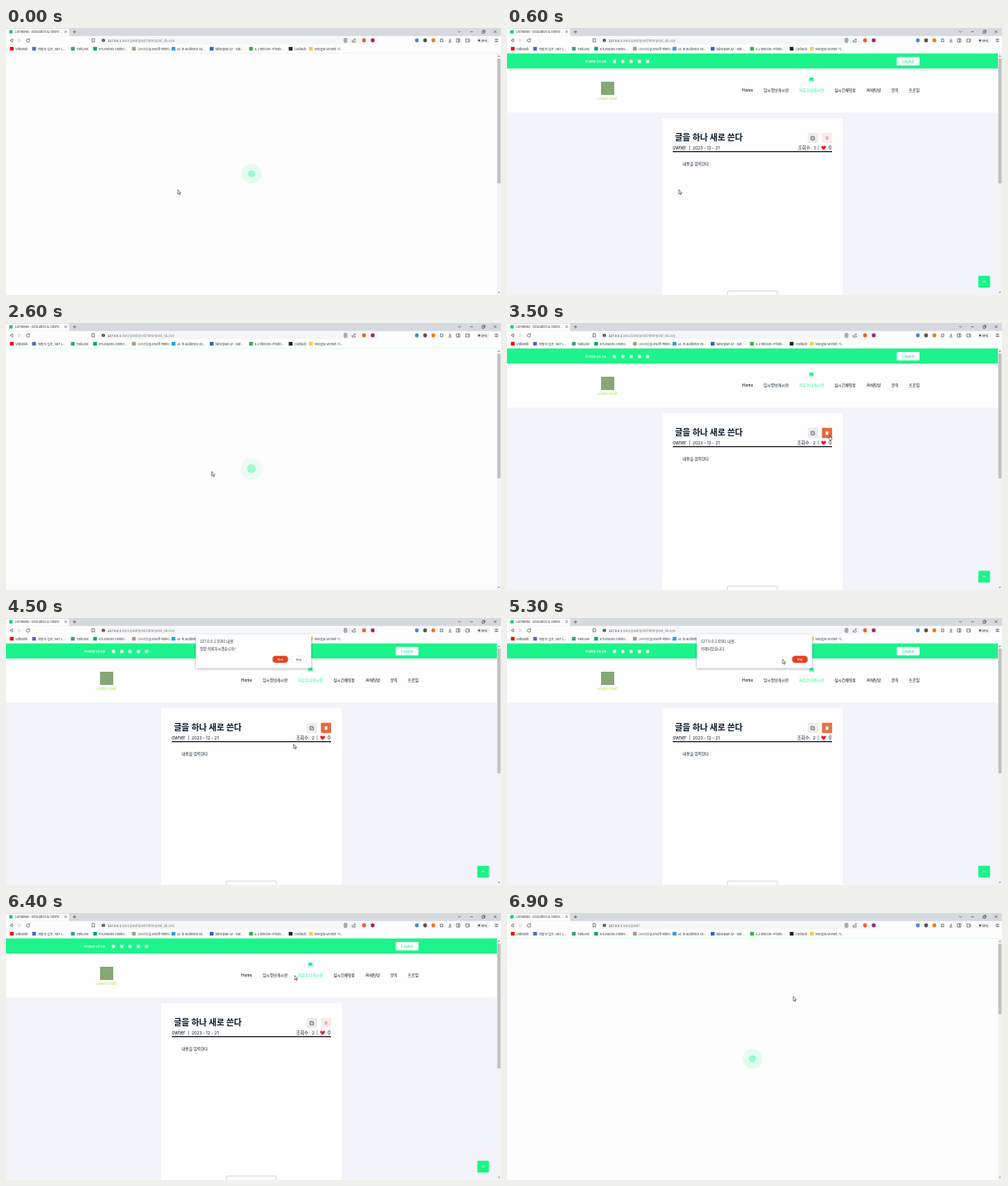
These frames come from a looping animation (600x323 px, 7000 ms). An HTML page:

```html
<!DOCTYPE html>
<html lang="ko">
<head>
<meta charset="utf-8">
<title>Post page</title>
<style>
  html, body { margin: 0; width: 100%; height: 100%; overflow: hidden; background: #fff; }
  svg { display: block; width: 100%; height: 100%; }
  text { font-family: "Noto Sans CJK KR", "Noto Sans CJK", sans-serif; fill: #333; white-space: pre; }
  .site text { font-family: Inter, "Noto Sans CJK KR", "Noto Sans CJK", sans-serif; fill: #081828; }
  .site .green { fill: #1cf48b; }
  .site .white { fill: #fff; }
  .line { fill: none; stroke: #555; stroke-width: .7; }
  .mid { text-anchor: middle; }
</style>
</head>
<body>
<svg viewBox="0 0 600 323">
  <defs>
    <filter id="shadow" x="-10%" y="-20%" width="120%" height="150%">
      <feDropShadow dx="0" dy="1" stdDeviation="1.5" flood-opacity=".35"/>
    </filter>
  </defs>

  <g id="page" class="site">
    <rect y="30.5" width="595" height="293" fill="#f2f4f9"/>
    <rect y="30.5" width="595" height="18.5" fill="#1cf48b"/>
    <text x="95" y="42" font-size="4" font-weight="600" class="white">Follow Us On:</text>
    <g id="social" fill="#fff"></g>
    <rect x="472.5" y="35" width="27.5" height="10.3" rx="1" fill="#fff"/>
    <text x="486.2" y="41.7" font-size="4.3" font-weight="500" class="mid green">Logout</text>

    <rect y="49" width="595" height="53.5" fill="#fefefe"/>
    <rect x="114" y="65" width="16" height="16" fill="#86a877"/>
    <text x="121.5" y="86.5" font-size="4" class="mid" style="fill:#a4e03c">Lesson Shelf</text>
    <path d="M366.5 60h5v5l-2.5-1.6-2.5 1.6z" fill="#1cf48b"/>
    <g id="nav" font-size="4.7"></g>

    <rect x="188" y="109" width="219" height="214" rx="1" fill="#fefefe"/>
    <text x="203.5" y="135.7" font-size="10.2" font-weight="700">글을 하나 새로 쓴다</text>
    <rect x="364.7" y="126.8" width="12.4" height="12.4" rx="1.2" fill="#ececee"/>
    <path class="line" d="M371.5 131.2h-2.8v4h4v-2.8M370.5 133.5l2.3-2.5" style="stroke:#333"/>
    <rect id="trash" x="381.7" y="126.8" width="12.4" height="12.4" rx="1.2"/>
    <path id="bin" d="M386 131.2h1.2v-.5h1.4v.5h1.2v.6h-3.8zM386.3 132.1h3.2l-.2 3.1h-2.8z"/>
    <text x="201" y="147" font-size="5.5">owner</text>
    <text x="220.4" y="147" font-size="5">|</text>
    <text x="225" y="147" font-size="5">2023 - 12 - 21</text>
    <text id="views" x="374" y="147" font-size="5.3" text-anchor="end"></text>
    <text x="376.3" y="147" font-size="5">|</text>
    <path d="M383.8 147.6c-5.2-3.8-2.2-6.5 0-4.1 2.2-2.4 5.2.3 0 4.1z" fill="#f0142c"/>
    <text x="390" y="147" font-size="5.5">0</text>
    <rect x="201" y="149" width="193" height="1.2" fill="#111"/>
    <text x="213" y="166" font-size="4.7">내용을 입력한다</text>
    <rect x="267.3" y="318.2" width="60.4" height="9" rx="1" fill="#fff" stroke="#bbb" stroke-width=".6"/>
    <rect x="571.3" y="299.8" width="14.2" height="14.2" rx="1" fill="#1cf48b"/>
    <path class="line" d="M576.5 307.8l1.9-1.9 1.9 1.9" style="stroke:#fff"/>
  </g>

  <g id="loader">
    <rect y="30.5" width="595" height="293" fill="#fdfdfd"/>
    <circle class="pulse" cx="297.5" cy="176.2" fill="#1cf48b"/>
    <circle class="pulse" cx="297.5" cy="176.2" fill="#1cf48b"/>
  </g>

  <g id="scrollbar">
    <rect x="595" y="30.5" width="5" height="293" fill="#f4f4f4"/>
    <rect id="thumb" x="595.5" y="37" width="4" fill="#c1c1c1"/>
    <path d="M596.3 34.8l1.2-1.6 1.2 1.6zM596.3 319.2l1.2 1.6 1.2-1.6z" fill="#666"/>
  </g>

  <g id="browser">
    <rect width="600" height="30.5" fill="#fdfdfd"/>
    <rect width="600" height="9.7" fill="#d6d9de"/>
    <path d="M0 9.7V2q0-1.2 1.2-1.2h74q1.2 0 1.2 1.2v7.7z" fill="#fdfdfd"/>
    <rect x="4" y="2.6" width="4" height="4" fill="#21c77a"/>
    <text x="11" y="6.2" font-size="3.7">LernRows - Education &amp; Online ..</text>
    <path class="line" d="M71 3.2l2.6 2.6m0-2.6L71 5.8M83 2.7v4m-2-2h4M548 3.7l1.6 1.6 1.6-1.6M562.5 4.6h3.4M577 3.8h2.6v2.6H577zM578 3.8v-1h2.6v2.6h-1M591.3 2.9l3.2 3.2m0-3.2l-3.2 3.2"/>
    <rect x="112" y="11" width="338" height="8.4" rx="1" fill="#f5f6f7"/>
    <path class="line" d="M8 13l-3 2 3 2zM28 13.6a2 2 0 1 0 .7 1.5M28.6 12.6v1.4h-1.5M104.2 12.8h3v4.4l-1.5-1.1-1.5 1.1z"/>
    <path class="line" d="M15 13l3 2-3 2z" style="stroke:#ccc"/>
    <circle cx="118" cy="15" r="2.1" fill="#444"/>
    <path d="M118 13.6v.5m0 .6v1.7" stroke="#fff" stroke-width=".6"/>
    <text x="123" y="16.7" font-size="4">127.0.0.1<tspan id="path" fill="#777"></tspan></text>
    <path class="line" d="M410 12.8h3v4.4h-3zM410.8 14.2h1.4m-1.4 1.3h1.4M419.7 14.5v2.5h3.6v-1.5M421 15.5q.2-2 2.6-2l-1-.9m1 .9l-1 .9M538.2 12.8v3m-1.3-1.2l1.3 1.3 1.3-1.3M536.2 17h4M546 13h4v4h-4zM548.5 13v4M557.5 13.2h4v3.8h-4zM559.7 15h1.8M592.5 13.5h4m-4 1.5h4m-4 1.5h4M526.4 13.4h3v3.3h-3z"/>
    <g id="extensions"></g>
    <rect x="570" y="11.6" width="17" height="7" rx="3.5" fill="#f0f1f2"/>
    <circle cx="573.5" cy="15.1" r="1.3" fill="#555"/>
    <text x="576" y="16.5" font-size="3.7">VPN</text>
    <g id="bookmarks" font-size="3.75"></g>
  </g>

  <g id="dialog" filter="url(#shadow)">
    <rect x="230" y="20" width="140" height="40.5" rx="1.8" fill="#fff"/>
    <text x="235" y="30.2" font-size="4.65">127.0.0.1:5501 내용:</text>
    <text id="message" x="235" y="39.2" font-size="4.4"></text>
    <g id="ok">
      <rect x="-10" y="45.2" width="20" height="9.6" rx="4.8" fill="#f6b3a4"/>
      <rect x="-9.2" y="46" width="18.4" height="8" rx="4" fill="#e5401e"/>
      <text y="51.5" font-size="3.8" class="mid" style="fill:#fff">확인</text>
    </g>
    <g id="cancel">
      <rect x="345.5" y="46" width="19" height="8" rx="4" fill="#fff" stroke="#ddd" stroke-width=".5"/>
      <text x="355" y="51.5" font-size="3.8" class="mid">취소</text>
    </g>
  </g>

  <g id="cursor" fill="#fff" stroke="#222" stroke-width=".55" stroke-linejoin="round">
    <path id="arrow" d="M0 0v5.4l1.2-1.1.9 1.9.8-.4-.9-1.8h1.7z"/>
    <path id="hand" d="M-.5 3.2V.4q.5-.6 1 0v1.8l2.3.5v1.9l-.6 1.4H.1L-1.5 3.7q.3-.8 1-.1z"/>
  </g>
</svg>

<script>
const $ = id => document.getElementById(id);
const show = (id, on) => $(id).setAttribute("display", on ? "inline" : "none");
const set = (el, attrs) => Object.entries(attrs).forEach(([k, v]) => el.setAttribute(k, v));
const dot = (x, y, r, color) => `<circle cx="${x}" cy="${y}" r="${r}" fill="${color}"/>`;

$("social").innerHTML = [130.3, 140.4, 150.4, 160.5, 170.4]
  .map(x => `<rect x="${x - 1.8}" y="38.7" width="3.6" height="3.6"/>`).join("");

$("nav").innerHTML = [
  [285, "Home"], [311, "입시정보게시판"], [354, "자유수다게시판"], [397, "실시간채팅방"],
  [436, "AI채팅방"], [466, "문의"], [487, "프로필"]
].map(([x, label], i) =>
  `<text x="${x}" y="77" ${i == 2 ? 'class="green"' : ""} ${i ? "" : 'font-weight="500"'}>${label}</text>`).join("");

$("bookmarks").innerHTML = [
  [7, "#f00c0c", "VidNook"], [34, "#5367b8", "개발의 입문, NET L..."], [81, "#3f9d82", "TalkLMX"],
  [108, "#0aa66a", "K7Lessons Online..."], [155, "#a89b80", "[스터디]QUVSoft 백엔드..."],
  [203, "#2d9be8", "#1 in audience ex..."], [249.3, "#2b65c8", "tableplan.zz - Dat..."],
  [297, "#35ad49", "4.2 million+ Photo..."], [345, "#222", "CodNub"], [369.5, "#f6cb55", "Moogra Velmet 가..."]
].map(([x, color, label]) =>
  `<rect x="${x - 2.3}" y="22.9" width="4.6" height="4.4" fill="${color}"/><text x="${x + 4.5}" y="26.5">${label}</text>`).join("");

$("extensions").innerHTML = [
  [434, "#f25a2b"], [444.5, "#9c246b"], [498, "#4f86d9"], [508, "#5c5254"], [518, "#ef7a1a"]
].map(([x, color]) => dot(x, 15, 2.4, color)).join("");

const LOOP = 7000, TICK = 100;
// Preloader periods: animation start and moment the page shows.
const loads = [[-430, 300], [2050, 2800], [6470, LOOP]];
// Cursor stops: time, x, y.
const stops = [
  [0, 208.3, 195.5], [1100, 208.3, 195.5], [1500, 249.5, 179.7], [2800, 249.5, 179.7],
  [3500, 391, 135.8], [4300, 391, 135.8], [4500, 348.7, 152.5], [5000, 334, 50],
  [5400, 334, 50], [5700, 335.2, 54.5], [6100, 353, 50], [6200, 353, 50],
  [6600, 347, 101], [LOOP, 347, 101]
];

function cursorAt(t) {
  const i = stops.findIndex(s => s[0] > t);
  const [t0, x0, y0] = stops[i - 1], [t1, x1, y1] = stops[i];
  const p = (t - t0) / (t1 - t0), e = p * p * (3 - 2 * p);
  return [x0 + (x1 - x0) * e, y0 + (y1 - y0) * e];
}

function draw(t) {
  const load = loads.find(([from, to]) => t >= from && t < to);
  show("loader", load);
  if (load) document.querySelectorAll(".pulse").forEach((circle, i) => {
    const phase = ((t - load[0]) / 1600 + i / 2) % 1;
    set(circle, { r: 15.6 * phase, opacity: (1 - phase) / 2 });
  });

  const left = t >= 6470;
  $("path").textContent = left ? ":5501/post/" : ":5501/post/post.html?post_id=330";
  $("thumb").setAttribute("height", left ? 85.5 : 151);
  $("views").textContent = "조회수:  " + (t < 2050 ? 1 : 2);

  const hover = t >= 3400 && t < 6200;
  $("trash").setAttribute("fill", !hover ? "#f6edea" : t < 5100 ? "#e36a42" : "#e5754c");
  $("bin").setAttribute("fill", hover ? "#fff" : "#e3a997");

  const confirming = t >= 4300 && t < 5100, alerting = t >= 5300 && t < 6200;
  show("dialog", confirming || alerting);
  show("cancel", confirming);
  $("message").textContent = confirming ? "정말 삭제하시겠습니까?" : "삭제되었습니다.";
  $("ok").setAttribute("transform", `translate(${confirming ? 332.5 : 355})`);

  const pointing = t >= 3400 && t < 4300;
  show("hand", pointing);
  show("arrow", !pointing);
  $("cursor").setAttribute("transform", `translate(${cursorAt(t)})`);
}

const begin = performance.now();
function frame() {
  const t = (performance.now() - begin) % LOOP;
  draw(Math.floor(t / TICK) * TICK);
  requestAnimationFrame(frame);
}
frame();
</script>
</body>
</html>
```
